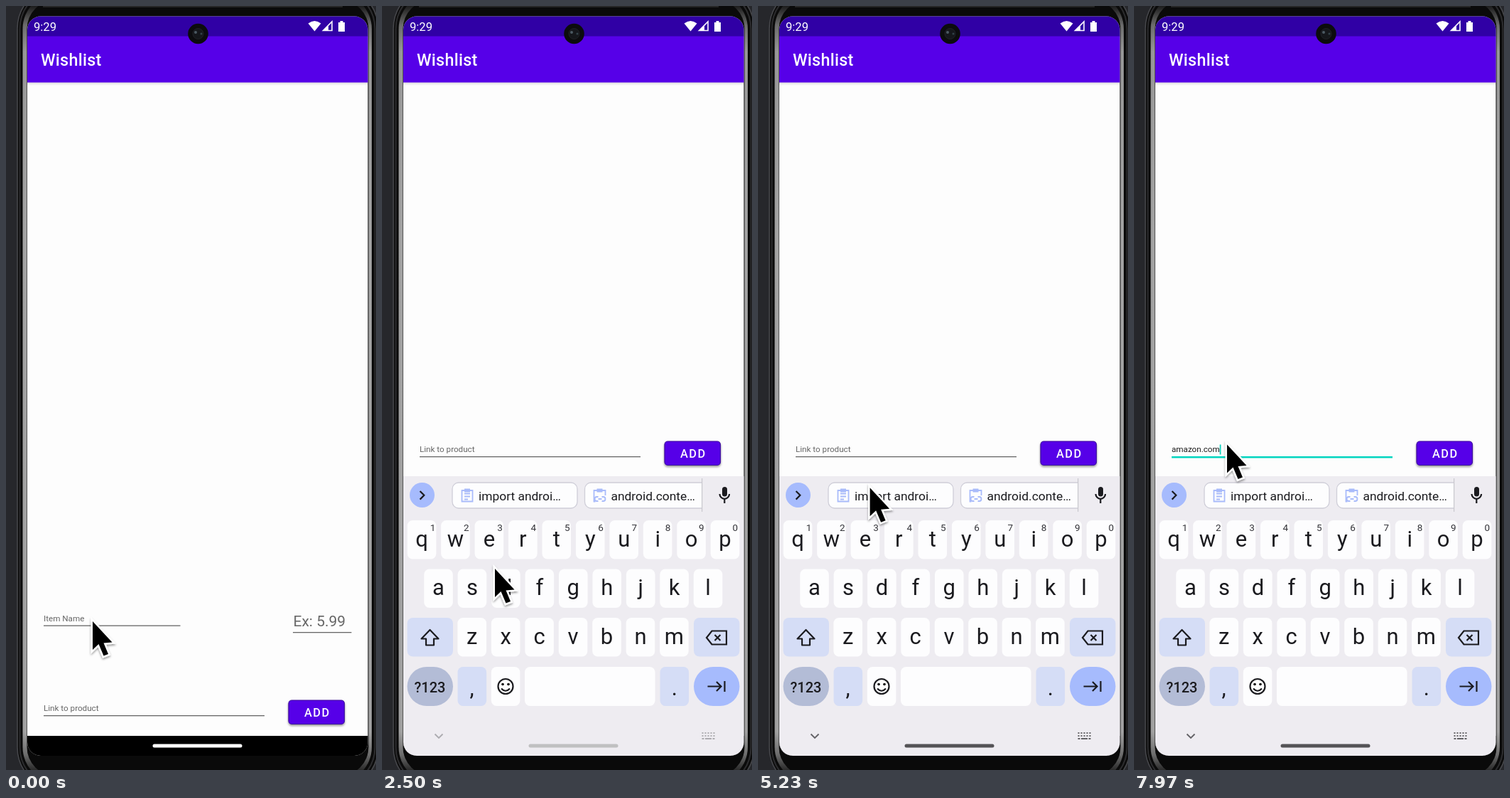
Animation of 521 by 1074 pixels, one loop 8000 ms. Source, as an HTML page:

```html
<!DOCTYPE html>
<html lang="en">
<head>
<meta charset="utf-8">
<title>Wishlist</title>
<style>
html, body { margin: 0; width: 100%; height: 100%; overflow: hidden; background: #26272b; }
svg { display: block; width: 521px; height: 1074px; }
text { font-family: Roboto, sans-serif; }
.hint { font-size: 11.67px; fill: #666; }
.key { font-size: 31px; fill: #1b1b1f; text-anchor: middle; }
.digit { font-size: 13.5px; fill: #333338; text-anchor: middle; }
.chip { font-size: 17.4px; fill: #1b1b1f; }
.icon { fill: none; stroke: #1b1b1f; stroke-width: 2.2; }
.clip { fill: none; stroke: #a9bbfa; stroke-width: 1.8; }
</style>
</head>
<body>
<svg viewBox="0 0 521 1074" xmlns="http://www.w3.org/2000/svg">
  <defs>
    <linearGradient id="metal" gradientUnits="userSpaceOnUse" x1="0" y1="0" x2="0" y2="1074">
      <stop offset="0" stop-color="#1c1c1c"/>
      <stop offset=".025" stop-color="#6c6c6c"/>
      <stop offset=".06" stop-color="#979797"/>
      <stop offset=".3" stop-color="#a2a2a2"/>
      <stop offset=".95" stop-color="#a0a0a0"/>
      <stop offset=".98" stop-color="#6c6c6c"/>
      <stop offset="1" stop-color="#2a2a2a"/>
    </linearGradient>
    <linearGradient id="drop" x1="0" y1="0" x2="0" y2="1">
      <stop offset="0" stop-color="#000" stop-opacity=".13"/>
      <stop offset="1" stop-color="#000" stop-opacity="0"/>
    </linearGradient>
    <filter id="soft" x="-30%" y="-30%" width="160%" height="180%">
      <feDropShadow dx="0" dy="2" stdDeviation="1.6" flood-opacity=".4"/>
    </filter>
    <clipPath id="screen"><rect x="30" y="14.500" width="479.500" height="1039.500" rx="19"/></clipPath>
    <clipPath id="strip"><rect x="80" y="661" width="370" height="52"/></clipPath>
  </defs>

  <rect width="521" height="1074" fill="#26272b"/>
  <rect x="16" y="-28" width="508" height="1130" rx="60" fill="#0b0b0b" stroke="#45464a" stroke-width="1.600"/>
  <rect x="19.500" y="-24" width="500" height="1122" rx="56" fill="none" stroke="#2c2c2e" stroke-width="2"/>
  <rect x="23.500" y="-18" width="491.500" height="1110" rx="50" fill="url(#metal)"/>
  <rect x="29.500" y="-8" width="481" height="1090" rx="40" fill="#0a0a0a"/>
  <path d="M52 1h422" stroke="#252525" stroke-width="2"/>

  <g clip-path="url(#screen)">
    <rect x="30" y="14" width="480" height="1040" fill="#fdfdfd"/>
    <rect x="30" y="107" width="480" height="5" fill="url(#drop)"/>
    <rect x="30" y="42" width="480" height="65.500" fill="#5600e8"/>
    <rect x="30" y="14" width="480" height="28.500" fill="#3000a5"/>
    <text x="39" y="34.500" font-size="16.600" fill="#fff">9:29</text>
    <text x="49" y="83.800" font-size="23.330" font-weight="500" letter-spacing=".3" fill="#fff">Wishlist</text>
    <path d="M425.500 24.500Q434.500 17.500 443.500 24.500L434.500 35.500Z" fill="#fff"/>
    <path d="M446.500 34.500L459 22V34.500Z" fill="none" stroke="#fff" stroke-width="1.600"/>
    <path d="M446 35L454 27V35Z" fill="#fff"/>
    <path d="M468 23h2.500v-2h4v2h2.500v13h-9z" fill="#fff"/>

    <g id="top">
      <text class="hint" x="53" y="865">Item Name</text>
      <rect id="nameLine" x="53" width="192.500"/>
      <text x="404.500" y="872" font-size="21" fill="#666">Ex: 5.99</text>
      <rect x="404" y="880" width="82.500" height="1.300" fill="#666"/>
    </g>
    <g id="bottom">
      <text class="hint" id="link" x="53" y="991"></text>
      <rect id="caret" y="980.500" width="1.700" height="14" fill="#03cdb9"/>
      <rect id="linkLine" x="53" width="311"/>
      <rect x="398" y="976" width="78.500" height="33.500" rx="4.500" fill="#5600e8" stroke="#3b0a9c" stroke-width="1.200" filter="url(#soft)"/>
      <text x="420" y="999" font-size="16.330" font-weight="500" letter-spacing="1.460" fill="#fff">ADD</text>
    </g>
    <rect x="30" y="1026" width="480" height="28" fill="#000"/>
    <g id="board"></g>
    <rect id="handle" x="206.500" y="1037.500" width="126" height="5" rx="2.500"/>
  </g>

  <circle cx="270.500" cy="39" r="14.300" fill="#0c0c0e"/>
  <circle cx="270.500" cy="39" r="7.500" fill="#15171b" stroke="#202227"/>
  <circle cx="267" cy="37" r="2" fill="#4c5a63"/>
  <circle cx="275" cy="39" r="1.500" fill="#34434a"/>

  <g id="pointer" filter="url(#soft)">
    <path d="M0 0V40L8.500 32L15.500 48.500L22 46L15.500 30.500L27.500 29.500Z" fill="#000" stroke="#fff" stroke-width="5" paint-order="stroke" stroke-linejoin="miter"/>
  </g>
</svg>
<script>
const LOOP = 8000;
const WORD = "amazon.com";
const FOCUS_NAME = 1000, RESIZE = 1760, FOCUS_LINK = 5850;
const TYPE_START = 6350, TYPE_STEP = 140;
const LIFT = 364, BOARD_H = 393;
// time, x, y of the pointer tip
const PATH = [
  [0, 122, 865], [150, 122, 865], [850, 112, 855], [2120, 112, 855],
  [2500, 159, 791], [3700, 159, 791], [4500, 166, 701], [4950, 166, 701],
  [5700, 139.5, 625.5], [6100, 139.5, 625.5], [6600, 131, 616.5], [LOOP, 131, 616.5]
];

const $ = id => document.getElementById(id);
const clamp = v => Math.max(0, Math.min(1, v));
const span = (t, from, len) => clamp((t - from) / len);
const smooth = p => p * p * (3 - 2 * p);
const easeOut = p => 1 - (1 - p) * (1 - p);
const mix = (a, b, p) => a + (b - a) * p;
const rgb = (a, b, p) => `rgb(${a.map((v, i) => Math.round(mix(v, b[i], p)))})`;

const box = (x, y, w, h, r, fill) =>
  `<rect x="${x}" y="${y}" width="${w}" height="${h}" rx="${r}" fill="${fill}"/>`;
const label = (cls, x, y, s) => `<text class="${cls}" x="${x}" y="${y}">${s}</text>`;

function keyRow(letters, cx, y) {
  return [...letters].map((c, i) => {
    const x = cx + i * 47.45;
    return box(x - 20.3, y, 40.6, 54.5, 7.5, "#fdfdfe") + label("key", x, y + 36.5, c);
  }).join("");
}

function chip(id, x, text, linked) {
  const extra = linked
    ? `<path class="clip" d="M${x + 19} 690h-2a3 3 0 0 0 0 6h2m5 -6h2a3 3 0 0 1 0 6h-2m-5 -3h5"/>`
    : `<path class="clip" d="M${x + 17} 685.5h8m-8 4h8m-8 4h5"/>`;
  const body = linked
    ? `M${x + 15} 696.5h-2v-15.5h16v7`
    : `M${x + 13.5} 681h15v15.5h-15z`;
  return `<g id="${id}"><rect x="${x}" y="670" width="176" height="36" rx="9" fill="#fdfdfe" stroke="#cfced8" stroke-width="1.3"/>
    <path class="clip" d="${body}"/><path d="M${x + 17} 678.5h8v5h-8z" fill="#a9bbfa"/>${extra}
    ${label("chip", x + 37, 695, text)}</g>`;
}

function buildBoard() {
  const mod = "#d5ddf6", blue = "#a6bbfd";
  let s = box(30, 661, 480, BOARD_H, 0, "#eeecf1");
  s += `<circle cx="56.5" cy="687.5" r="17.5" fill="${blue}"/><path class="icon" d="M53.5 682l5.8 5.8l-5.8 5.8"/>`;
  s += `<g clip-path="url(#strip)">${chip("chipA", 99, "import androi…", false)}${chip("chipB", 285.5, "android.conte…", true)}</g>`;
  s += box(450, 664, 1.2, 47, 0, "#c9c8ce");
  s += box(479, 676, 7, 13.5, 3.5, "#1b1b1f") + '<path class="icon" d="M475.5 686a6.8 6.8 0 0 0 13.6 0m-6.8 7v6"/>';
  s += keyRow("qwertyuiop", 56, 723) + keyRow("asdfghjkl", 79.5, 791.5) + keyRow("zxcvbnm", 126.7, 860);
  [..."1234567890"].forEach((d, i) => s += label("digit", 71.5 + i * 47.3, 737.5, d));
  s += box(35.5, 860, 64.5, 54.5, 8, mod) + box(439, 860, 64.5, 54.5, 8, mod);
  s += '<path class="icon" stroke-linejoin="round" d="M67.5 877L55.5 889.5h6.5v9h11v-9h6.5z"/>';
  s += '<path class="icon" d="M464.5 878.5h20.5v19h-20.5l-7.5 -9.5zM468.5 884l8 8m0 -8l-8 8"/>';
  s += box(35.5, 929, 64.5, 55, 27.5, "#b3bcd6") + box(439, 929, 64.5, 55, 27.5, blue);
  s += '<text x="67.5" y="964.5" font-size="20" font-weight="500" text-anchor="middle" fill="#1b1b1f">?123</text>';
  s += box(106.5, 929, 40.6, 55, 7.5, mod) + label("key", 126.5, 968.5, ",");
  s += box(153.8, 929, 40.6, 55, 7.5, "#fdfdfe") + box(201, 929, 183.5, 55, 7.5, "#fdfdfe");
  s += box(391.5, 929, 40.6, 55, 7.5, mod) + label("key", 411.8, 969, ".");
  s += '<circle class="icon" cx="174" cy="956.5" r="10.5"/><circle cx="170" cy="953.5" r="1.8"/><circle cx="178" cy="953.5" r="1.8"/><path class="icon" d="M168 959.5q6 6.5 12 0"/>';
  s += '<path class="icon" d="M458.5 956.5h19m-6.5 -6.5l6.5 6.5l-6.5 6.5M482.5 949v15"/>';
  s += '<g id="nav" fill="none" stroke-width="1.9"><path d="M74.5 1023.5l5.5 5.5l5.5 -5.5"/>' +
    '<path d="M450.5 1022h18m-18 4h18" stroke-dasharray="2 2"/><path d="M450.5 1030h3m1.5 0h9m1.5 0h3"/></g>';
  $("board").innerHTML = s;
}

function pointerAt(t) {
  const i = Math.max(1, PATH.findIndex(k => k[0] >= t));
  const [t0, x0, y0] = PATH[i - 1], [t1, x1, y1] = PATH[i];
  const p = smooth(span(t, t0, t1 - t0));
  return [mix(x0, x1, p), mix(y0, y1, p)];
}

function underline(el, y, active) {
  el.setAttribute("y", y);
  el.setAttribute("height", active ? 2.5 : 1.3);
  el.setAttribute("fill", active ? "#03d5c0" : "#666");
}

function popChip(id, cx, t, start) {
  const p = span(t, start, 200), k = mix(0.5, 1, easeOut(p));
  $(id).setAttribute("transform", `translate(${cx} 688) scale(${k}) translate(${-cx} -688)`);
  $(id).setAttribute("opacity", t < start ? 0 : Math.min(1, 0.6 + 2 * p));
}

function draw(t) {
  const open = t >= RESIZE;
  $("top").setAttribute("visibility", open ? "hidden" : "visible");
  $("bottom").setAttribute("transform", `translate(0 ${open ? -LIFT : 0})`);
  underline($("nameLine"), 870.5, t >= FOCUS_NAME);
  underline($("linkLine"), 997, t >= FOCUS_LINK);

  const count = Math.max(0, Math.min(WORD.length, Math.floor((t - TYPE_START) / TYPE_STEP) + 1));
  const link = $("link");
  link.textContent = count ? WORD.slice(0, count) : "Link to product";
  link.style.fill = count ? "#1c1c1c" : "#666";
  const lastInput = count ? TYPE_START + (count - 1) * TYPE_STEP : FOCUS_LINK;
  const lit = t >= FOCUS_LINK && (t - lastInput) % 1000 < 500;
  $("caret").setAttribute("x", 53 + (count ? link.getComputedTextLength() : 0));
  $("caret").setAttribute("opacity", lit ? 1 : 0);

  const slide = easeOut(span(t, RESIZE, 260));
  $("board").setAttribute("transform", `translate(0 ${BOARD_H * (1 - slide)})`);
  popChip("chipA", 187, t, 1966);
  popChip("chipB", 373.5, t, 2059);

  const fade = span(t, 2070, 1200);
  $("handle").setAttribute("fill", rgb([253, 253, 253], [84, 83, 86], fade));
  $("nav").setAttribute("stroke", rgb([214, 213, 218], [100, 99, 103], fade));
  $("pointer").setAttribute("transform", `translate(${pointerAt(t)})`);
}

buildBoard();
const begin = performance.now();
function tick() {
  draw((performance.now() - begin) % LOOP);
  requestAnimationFrame(tick);
}
tick();
</script>
</body>
</html>
```
